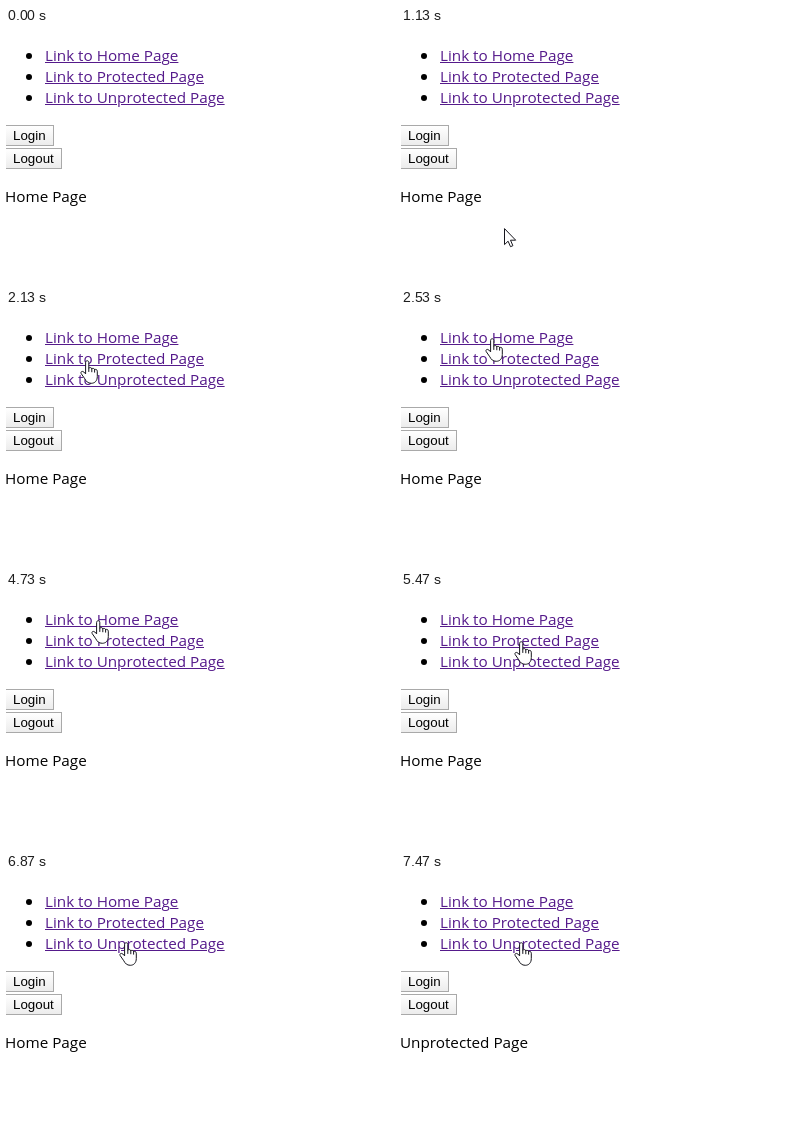
An HTML page for the animation above (8000 ms loop, 389 by 254 pixels).

```html
<!DOCTYPE html>
<html lang="en">
<head>
<meta charset="utf-8">
<title>Link navigation</title>
<style>
  html, body { margin: 0; width: 100%; height: 100%; overflow: hidden; background: #fff; }
  #stage { position: relative; width: 389px; height: 254px; overflow: hidden; background: #fff; }
  #stage > * { position: absolute; white-space: nowrap; }
  .text { font: 15.25px/20px "Open Sans", "Noto Sans", sans-serif; color: #000; }
  .link {
    left: 39px; color: #551a8b;
    text-decoration: underline 1px; text-underline-offset: 1px;
  }
  .link.active { color: #f00; }
  .dot { left: 20px; width: 6px; height: 6px; border-radius: 50%; background: #000; }
  .button {
    left: -1px; box-sizing: border-box; height: 21px; padding: 0 7px;
    border: 1px solid #a9a9a9; background: linear-gradient(#fff, #ececec);
    font: 13.333px/19px "Liberation Sans", Arial, sans-serif; color: #000;
  }
  #view { left: -1px; top: 158px; }
  #overlay { left: 0; top: 0; }
</style>
</head>
<body>
<div id="stage">
  <i class="dot" style="top:25px"></i>
  <i class="dot" style="top:46px"></i>
  <i class="dot" style="top:67px"></i>
  <span class="text link" style="top:17px">Link to Home Page</span>
  <span class="text link" id="protected" style="top:38px">Link to Protected Page</span>
  <span class="text link" id="unprotected" style="top:59px">Link to Unprotected Page</span>
  <span class="button" style="top:97px">Login</span>
  <span class="button" style="top:120px">Logout</span>
  <span class="text" id="view">Home Page</span>
  <svg id="overlay" width="389" height="254" fill="#fff" stroke="#15151c" stroke-linejoin="round" stroke-linecap="round">
    <path id="arrow" stroke-linejoin="miter"
      d="M.5 1V16.6L4.1 13.2 6.5 18.7 8.9 17.7 6.5 12.2H11.3Z"/>
    <g id="hand">
      <path d="M5.6 13.5V2.4C5.6.2 8.8.2 8.8 2.4V8.2C9.6 7.2 11.6 7.4 11.8 8.8
        C12.6 8 14.4 8.3 14.6 9.7C15.6 9 17.3 9.5 17.3 11.2V16.5
        C17.3 20.8 14.8 23.3 11.3 23.3C7.8 23.3 6.2 21.4 4.8 18.8L1.2 13.6
        C.2 11.8 2.2 10.6 3.6 11.8Z"/>
      <path fill="none" d="M8.8 8.2V11.5M11.8 8.8V11.8M14.6 9.7V12.2"/>
    </g>
  </svg>
</div>
<script>
const LOOP = 8000, RATE = 15; // the screen refreshes 15 times a second
const $ = id => document.getElementById(id);

// Pointer moves in ticks; bend bows the way sideways
const entry = { tick: 16, x: 87, y: 225 };
const moves = [
  { from: 16, to: 17, x: 103, y: 200 },
  { from: 19, to: 25, x: 74, y: 200, bend: [0, 13] },
  { from: 25, to: 32, x: 80, y: 50, bend: [-19, 0] },
  { from: 32, to: 38, x: 90, y: 28 },
  { from: 70.7, to: 74, x: 119, y: 49 },
  { from: 92, to: 95, x: 123, y: 61 },
  { from: 96, to: 100, x: 120, y: 67 },
  { from: 102, to: 103, x: 119, y: 68 }
];

const clamp = k => Math.min(1, Math.max(0, k));
const smooth = k => k * k * (3 - 2 * k);

function tipAt(tick) {
  let { x, y } = entry;
  for (const m of moves) {
    const k = smooth(clamp((tick - m.from) / (m.to - m.from)));
    const [bx, by] = m.bend || [0, 0];
    const bow = Math.sin(Math.PI * k);
    x += (m.x - x) * k + bx * bow;
    y += (m.y - y) * k + by * bow;
  }
  return [Math.round(x), Math.round(y)];
}

function place(id, [x, y], shown) {
  $(id).style.display = shown ? "" : "none";
  $(id).setAttribute("transform", `translate(${x} ${y})`);
}

function render(ms) {
  const tick = Math.floor((ms + 5) * RATE / 1000);
  const [x, y] = tipAt(tick);
  const inside = tick >= entry.tick, overLink = y < 80;
  place("arrow", [x, y], inside && !overLink);
  place("hand", [x - 6, y], inside && overLink);
  $("protected").classList.toggle("active", tick === 81);
  $("unprotected").classList.toggle("active", tick === 111);
  $("view").textContent = tick >= 112 ? "Unprotected Page" : "Home Page";
}

const start = performance.now();
function loop() {
  render((performance.now() - start) % LOOP);
  requestAnimationFrame(loop);
}
loop();
</script>
</body>
</html>
```
